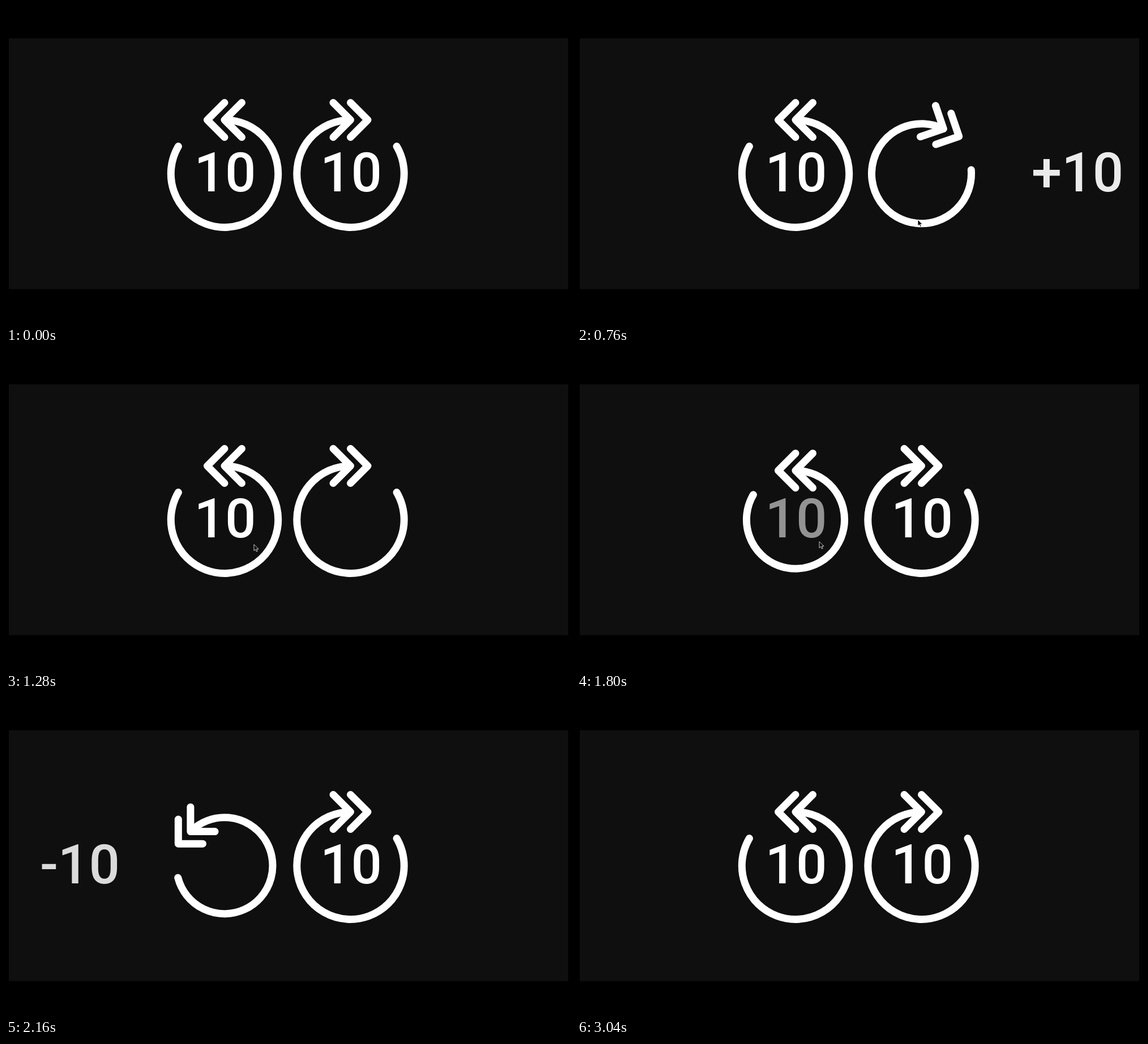
Recreate the animation shown at these times as an HTML page. Size 998 by 561 pixels, loop 3.08 s.

```html
<!DOCTYPE html>
<html lang="en">
<head>
<meta charset="utf-8">
<title>Seek buttons</title>
<style>
  html, body { margin: 0; width: 100%; height: 100%; overflow: hidden; background: #000; }
  svg { display: block; width: 100vw; height: 100vh; }
  .ring { fill: none; stroke: #fff; stroke-width: 13; stroke-linecap: round; stroke-linejoin: round; }
  text { font: 500 96px Roboto, sans-serif; fill: #fff; text-anchor: middle; }
</style>
</head>
<body>
<svg id="stage" viewBox="0 0 998 561">
  <rect width="998" height="561" fill="#000"/>
  <rect x="5" y="57" width="988" height="442.5" fill="#0f0f0f"/>
  <g id="buttons"></g>
  <path id="cursor" d="M0 0V11L2.6 8.7L4.4 12.6L6.2 11.8L4.5 8H8Z" fill="#000" stroke="#fff" stroke-width=".8"/>
</svg>
<script>
const LOOP = 3080, CENTER_Y = 295.7, BASELINE = 327;
const RADIUS = 94.7, PRESSED_RADIUS = 85, TURN = 45, TRAVEL = 300;
const GAP = 30.5 * Math.PI / 180;

const clamp = v => Math.min(1, Math.max(0, v));
const ramp = (t, start, length) => clamp((t - start) / length);

// cubic-bezier(.4, 0, .2, 1), solved by bisection
function ease(x) {
  let low = 0, high = 1;
  for (let i = 0; i < 24; i++) {
    const u = (low + high) / 2, v = 1 - u;
    if (1.2 * u * v * v + 0.6 * u * u * v + u ** 3 < x) low = u; else high = u;
  }
  return low * low * (3 - 2 * low);
}
const tween = (t, start, length) => ease(ramp(t, start, length));

function add(parent, tag, attrs, content = '') {
  const node = document.createElementNS('http://www.w3.org/2000/svg', tag);
  for (const key in attrs) node.setAttribute(key, attrs[key]);
  node.textContent = content;
  return parent.appendChild(node);
}

function createButton(x, side, click) {
  const group = add(document.getElementById('buttons'), 'g', {});
  return {
    x, side, click,
    ring: add(group, 'path', { class: 'ring' }),
    label: add(group, 'text', { x: x + 1, y: BASELINE }, '10'),
    flyer: add(group, 'text', { y: BASELINE }, side > 0 ? '+10' : '-10')
  };
}

const buttons = [createButton(386, -1, 1720), createButton(608.5, 1, 270)];
const cursor = document.getElementById('cursor');

function ringPath(r) {
  const chevron = x => `M${x - 30.5} ${-r - 30.5}L${x} ${-r}L${x - 30.5} ${-r + 30.5}`;
  return `M0 ${-r}A${r} ${r} 0 1 0 ${r * Math.cos(GAP)} ${-r * Math.sin(GAP)}` + chevron(0) + chevron(30.5);
}

function drawButton({ x, side, click, ring, label, flyer }, time) {
  const t = time - click;
  const press = tween(t, 0, 145) - tween(t, 440, 182);
  const turn = tween(t, 110, 310) - tween(t, 440, 160);
  const slide = tween(t, 130, 545);
  ring.setAttribute('d', ringPath(RADIUS + (PRESSED_RADIUS - RADIUS) * press));
  ring.setAttribute('transform', `translate(${x} ${CENTER_Y}) scale(${side} 1) rotate(${TURN * turn})`);
  label.setAttribute('opacity', 1 - ramp(t, 0, 180) + ramp(t, 1030, 200));
  flyer.setAttribute('x', x + side * TRAVEL * slide);
  flyer.setAttribute('opacity', slide * (1 - ramp(t, 850, 150)));
}

function drawCursor(time) {
  const toLeft = tween(time, 800, 440), settle = tween(time, 1300, 400);
  const x = 602 - 164 * toLeft - 10 * settle;
  const y = 377 - 37.5 * toLeft - 5 * settle;
  cursor.setAttribute('transform', `translate(${x} ${y})`);
  cursor.setAttribute('visibility', time >= 240 && time < 1960 ? 'visible' : 'hidden');
}

function render(time) {
  buttons.forEach(button => drawButton(button, time));
  drawCursor(time);
}

const begin = performance.now();
function tick() {
  render((performance.now() - begin) % LOOP);
  requestAnimationFrame(tick);
}
tick();
</script>
</body>
</html>
```
